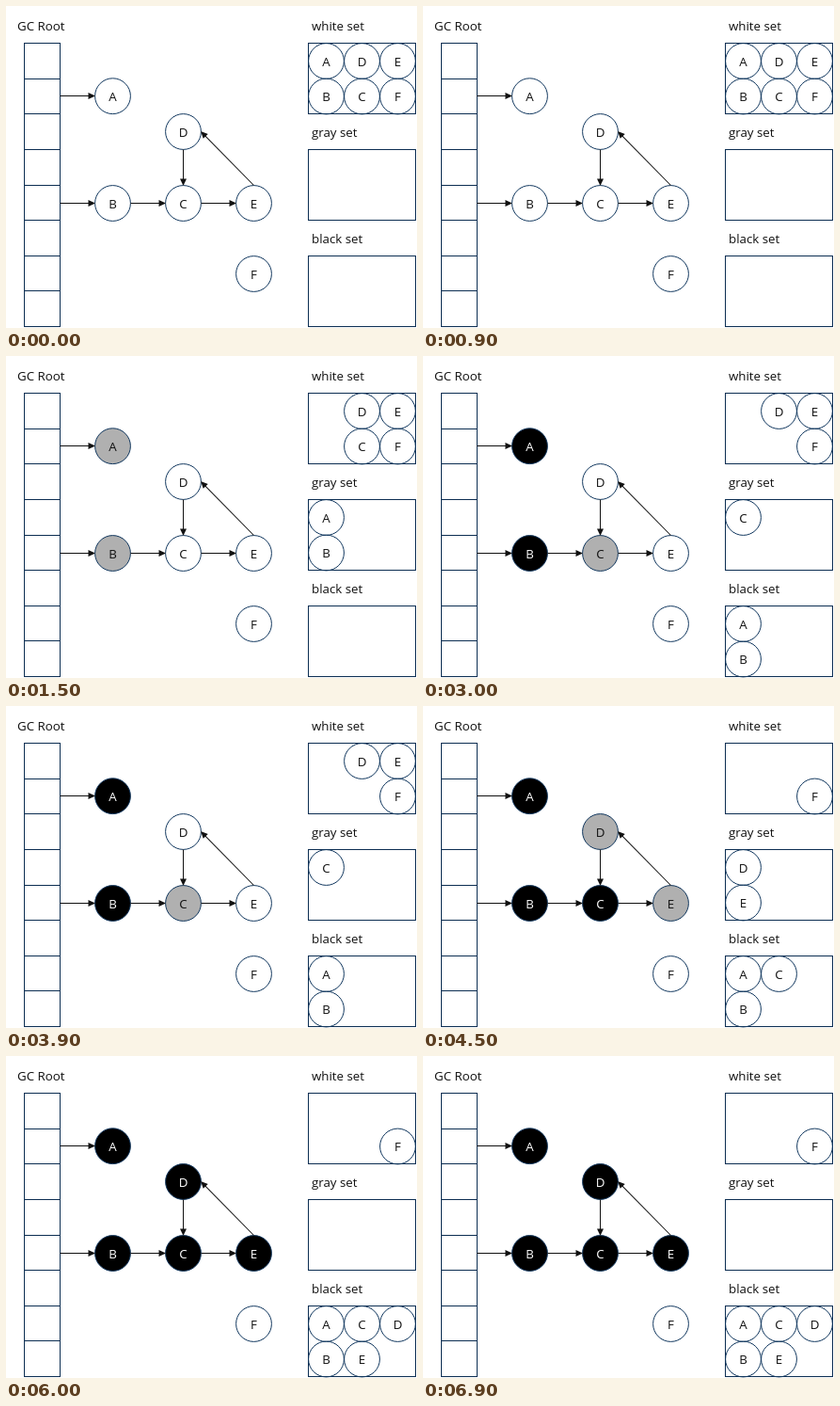
An HTML page that plays this animation: 437x342 px, repeating every 7.5 s.

```html
<!DOCTYPE html>
<html lang="en">
<head>
<meta charset="utf-8">
<title>Tri-colour marking</title>
<style>
  html, body { margin: 0; width: 100%; height: 100%; overflow: hidden; background: #fff; }
  svg { display: block; width: 437px; height: 342px; }
  text { font: 13.3px "Open Sans", "Noto Sans", sans-serif; fill: #111; }
  .label { text-anchor: middle; }
  .outline { fill: none; stroke: #0c2e52; stroke-width: 1; }
  .node { stroke: #12385f; stroke-width: 1; }
  .arrow { stroke: #111; stroke-width: 1; }
  .head { fill: #111; }
</style>
</head>
<body>
<svg id="stage" viewBox="0 0 437 342"></svg>
<script>
const STEP_MS = 1500, STEPS = 5, RADIUS = 18.9;
const stage = document.getElementById("stage");

// grayAt: step at which the node turns gray; slots are [column, row] per set
const nodes = [
  { name: "A", x: 113.5, y: 95.7, grayAt: 1, slots: [[0, 0], [0, 0], [0, 0]] },
  { name: "B", x: 113.5, y: 209.5, grayAt: 1, slots: [[0, 1], [0, 1], [0, 1]] },
  { name: "C", x: 188.5, y: 209.5, grayAt: 2, slots: [[1, 1], [0, 0], [1, 0]] },
  { name: "D", x: 188.5, y: 133.5, grayAt: 3, slots: [[1, 0], [0, 0], [2, 0]] },
  { name: "E", x: 263.5, y: 209.5, grayAt: 3, slots: [[2, 0], [0, 1], [1, 1]] },
  { name: "F", x: 263.5, y: 284.5, grayAt: Infinity, slots: [[2, 1]] }
];
const sets = [
  { title: "white set", top: 39.5, fill: "#fff", ink: "#111" },
  { title: "gray set", top: 152.5, fill: "#b0b0b0", ink: "#111" },
  { title: "black set", top: 265.5, fill: "#000", ink: "#fff" }
];

function add(tag, attrs, parent = stage) {
  const el = document.createElementNS("http://www.w3.org/2000/svg", tag);
  for (const key in attrs) el.setAttribute(key, attrs[key]);
  return parent.appendChild(el);
}

function write(text, x, y, parent, className = "") {
  const el = add("text", { x, y, class: className }, parent);
  el.textContent = text;
  return el;
}

function box(x, y, width, height) {
  add("rect", { x, y, width, height, class: "outline" });
}

function arrow(x1, y1, x2, y2) {
  const angle = Math.atan2(y2 - y1, x2 - x1) * 180 / Math.PI;
  const length = Math.hypot(x2 - x1, y2 - y1);
  const g = add("g", { transform: `translate(${x1} ${y1}) rotate(${angle})` });
  add("path", { d: `M0 0H${length - 6}`, class: "arrow" }, g);
  add("path", { d: `M${length} 0l-7.5 -3.5v7z`, class: "head" }, g);
}

function disc(name, x, y, fill) {
  const g = add("g", { transform: `translate(${x} ${y})` });
  const circle = add("circle", { r: RADIUS, class: "node", fill }, g);
  const label = write(name, 0, 5, g, "label");
  return { g, circle, label };
}

write("GC Root", 12, 26);
box(19.5, 39.5, 38, 301);
for (let i = 1; i < 8; i++) {
  add("path", { d: `M19.5 ${Math.floor(39.7 + i * 37.6) + 0.5}h38`, class: "outline" });
}
for (const set of sets) {
  write(set.title, 325, set.top - 13.5);
  box(321.5, set.top, 114, 75);
}
for (const node of nodes) {
  node.main = disc(node.name, node.x, node.y, "#fff");
  node.member = disc(node.name, 0, 0, "none");
}
arrow(57.5, 95.5, 95, 95.5);
arrow(57.5, 209.5, 95, 209.5);
arrow(132.5, 209.5, 170, 209.5);
arrow(207.5, 209.5, 245, 209.5);
arrow(188.5, 152.5, 188.5, 191);
arrow(263.5, 190.5, 207, 133);

function render(time) {
  const step = Math.floor(time / STEP_MS) % STEPS;
  for (const { main, member, grayAt, slots } of nodes) {
    const color = step < grayAt ? 0 : step === grayAt ? 1 : 2;
    const { top, fill, ink } = sets[color];
    const [column, row] = slots[color];
    main.circle.setAttribute("fill", fill);
    main.label.style.fill = ink;
    member.g.setAttribute("transform",
      `translate(${340.5 + column * 38} ${top + 19 + row * 37.5})`);
  }
}

const start = performance.now();
function tick() {
  render(performance.now() - start);
  requestAnimationFrame(tick);
}
tick();
</script>
</body>
</html>
```
